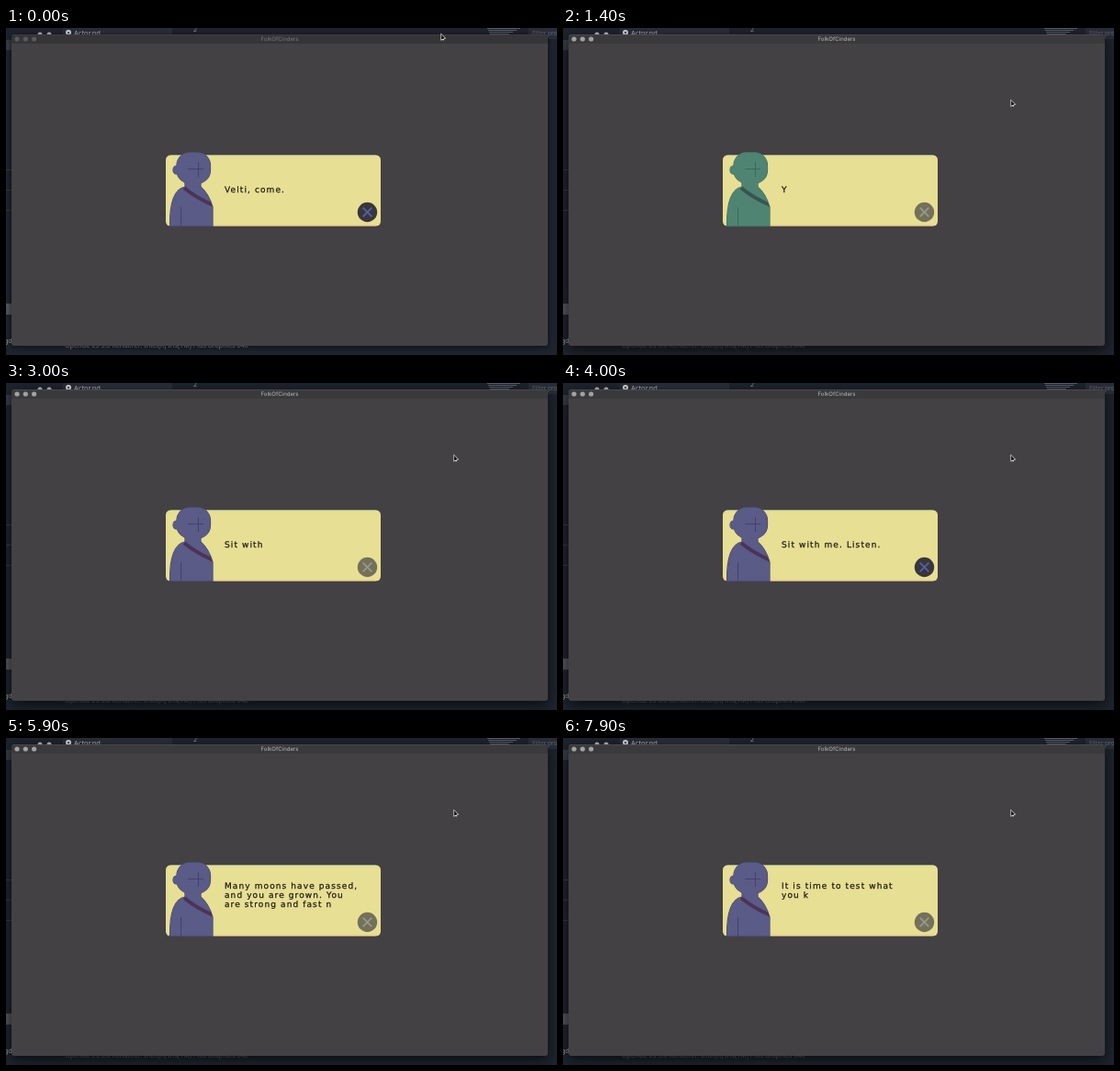
These frames come from a looping animation (600x356 px, 8 s). An HTML page with a canvas:

```html
<!DOCTYPE html>
<html lang="en">
<head>
<meta charset="utf-8">
<title>Dialogue box</title>
<style>
  html, body { margin: 0; width: 600px; height: 356px; overflow: hidden; background: #1e232d; }
  body { position: relative; }
  canvas { display: block; }
  #title, #speech { position: absolute; white-space: pre; text-rendering: geometricPrecision; }
  #title { left: 6px; width: 584px; top: 7.5px; text-align: center; font: 6.1px/10px Inter, sans-serif; }
  #speech {
    left: 238px; color: #211a14; letter-spacing: 1.1px;
    font: 9px/9.7px "DejaVu Sans", sans-serif; -webkit-text-stroke: 0.25px #211a14;
  }
</style>
</head>
<body>
<canvas id="stage" width="600" height="356"></canvas>
<div id="title">FolkOfCinders</div>
<div id="speech"></div>
<script>
const LOOP = 8000, STEP = 100, RATE = 0.04, LINE = 9.7;
const FOCUS = 900;
const ctx = document.getElementById('stage').getContext('2d');
const title = document.getElementById('title');
const speech = document.getElementById('speech');

const BLUE = { body: '#5a5b86', edge: '#46406c', sash: '#4a3458' };
const GREEN = { body: '#4f8473', edge: '#3a6a5e', sash: '#36564f' };

const lines = [
  { start: -2000, who: BLUE, text: 'Velti, come.' },
  { start: 1375, who: GREEN, text: 'Yes, Dorvel. What is it?' },
  { start: 2775, who: BLUE, text: 'Sit with me. Listen.' },
  { start: 4200, who: BLUE, text: 'Many moons have passed,\nand you are grown. You\nare strong and fast now,\nand I will need help.' },
  { start: 7175, who: BLUE, text: 'It is time to test what\nyou k\n\n' }
];

function rect(color, x, y, w, h) {
  ctx.fillStyle = color;
  ctx.fillRect(x, y, w, h);
}

function round(color, x, y, w, h, r) {
  ctx.fillStyle = color;
  ctx.beginPath();
  ctx.roundRect(x, y, w, h, r);
  ctx.fill();
}

function disc(color, x, y, r) {
  round(color, x - r, y - r, r * 2, r * 2, r);
}

function label(text, x, y, size, color) {
  ctx.fillStyle = color;
  ctx.font = size + 'px "Noto Sans", sans-serif';
  ctx.fillText(text, x, y);
}

// Eased progress from 0 to 1 between two times
function ease(t, from, to) {
  const k = Math.min(1, Math.max(0, (t - from) / (to - from)));
  return k * k * (3 - 2 * k);
}

function drawEditor(active) {
  rect('#1e232d', 0, 0, 600, 356);
  rect('#292e39', 62, 0, 119, 9);
  rect('#292e39', 569, 0, 31, 12);
  disc('#d5d7da', 68, 5, 3);
  disc('#292e39', 68, 5, 1);
  label('Actor.gd', 74, 8, 7.5, '#b5b8bd');
  label('2', 204, 4, 7, '#8d929b');
  label('Filter prop', 573, 8, 6.5, '#626771');
  disc('#b5b8bd', 37, 7, 2.5);
  disc('#b5b8bd', 47, 7, 2.5);
  for (let i = 0; i < 4; i++) rect('#59616d', 524 + i, i * 2, 36 - i * 5, 1);
  for (let i = 0; i < 3; i++) rect('#343943', 0, 154 + i * 22, 6, 1);
  rect('#363b45', 0, 13, 6, 11);
  rect('#50545d', 0, 300, 6, 12);
  label('gd', -2, 343, 7, '#a0a4aa');
  label('OpenGL ES 3.0 Renderer: Intel(R) Iris(TM) Plus Graphics 640', 64, 347.5, 7.2,
    active ? '#62666d' : '#8f9398');
}

function drawWindow(active) {
  ctx.save();
  ctx.shadowColor = 'rgba(0,0,0,.65)';
  ctx.shadowBlur = active ? 14 : 6;
  ctx.shadowOffsetY = active ? 4 : 1;
  round('#434143', 6, 7, 584, 339, 3);
  ctx.restore();
  round(active ? '#3a393b' : '#353437', 6, 7, 584, 10, [3, 3, 0, 0]);
  rect(active ? '#555456' : '#434245', 8, 7, 580, 0.6);
  for (let i = 0; i < 3; i++) disc(active ? '#a3a2a3' : '#59585a', 12 + i * 9.3, 12, 2.6);
  title.style.color = active ? '#b9b8b9' : '#79787a';
}

function drawPanel() {
  round('#e7df94', 174, 138.6, 234, 77, 5);
  rect('#cfe6a5', 179, 138.6, 224, 1);
  rect('#e9c18c', 179, 214.6, 224, 1);
}

const body = new Path2D();
body.moveTo(195, 164);
body.lineTo(195, 173);
body.quadraticCurveTo(178, 176, 178.5, 215.6);
body.lineTo(225, 215.6);
body.lineTo(225, 195);
body.quadraticCurveTo(221, 181, 212, 173);
body.lineTo(212, 164);

const head = new Path2D();
head.roundRect(186, 135.5, 36.5, 33.5, 14);

const ear = new Path2D();
ear.ellipse(185.5, 154.5, 3.5, 4.5, 0, 0, Math.PI * 2);

function drawPortrait(c) {
  const parts = [body, ear, head];
  ctx.save();
  ctx.strokeStyle = c.edge;
  ctx.lineWidth = 1.2;
  parts.forEach(p => ctx.stroke(p));
  ctx.fillStyle = c.body;
  parts.forEach(p => ctx.fill(p));
  rect(c.edge, 190, 195, 1, 20);
  rect(c.edge, 198, 153, 17, 1);
  rect(c.edge, 209, 146, 1, 16);
  ctx.clip(body);
  ctx.strokeStyle = c.sash;
  ctx.lineWidth = 4;
  ctx.beginPath();
  ctx.moveTo(194, 174);
  ctx.quadraticCurveTo(207, 185, 226, 193);
  ctx.stroke();
  ctx.restore();
}

function drawButton(ready) {
  const x = 393.5, y = 200.5, arm = 4.8;
  disc(ready ? '#39373b' : '#747059', x, y, 10.7);
  ctx.strokeStyle = ready ? '#5560a8' : '#96988f';
  ctx.lineWidth = 1.8;
  ctx.beginPath();
  for (const s of [-1, 1]) {
    ctx.moveTo(x - arm, y - arm * s);
    ctx.lineTo(x + arm, y + arm * s);
  }
  ctx.stroke();
}

function drawPointer(t) {
  const fall = ease(t, 0, 700), settle = ease(t, FOCUS, 1200);
  ctx.save();
  ctx.translate(473.6 + 12 * fall + 2 * settle, 6.6 + 56 * fall + 16 * settle);
  ctx.beginPath();
  ctx.moveTo(0.5, 0.5);
  ctx.lineTo(0.5, 6);
  ctx.lineTo(4.3, 4.4);
  ctx.closePath();
  ctx.moveTo(2, 4.5);
  ctx.lineTo(3, 6.8);
  ctx.strokeStyle = '#dcdcdc';
  ctx.lineWidth = 1.4;
  ctx.stroke();
  ctx.fillStyle = '#111';
  ctx.fill();
  ctx.restore();
}

function draw(t) {
  const active = t >= FOCUS;
  const line = lines.filter(l => l.start <= t).pop();
  const typed = Math.floor((t - line.start) * RATE);
  const rows = line.text.split('\n').length;

  drawEditor(active);
  drawWindow(active);
  drawPanel();
  drawPortrait(line.who);
  drawButton(typed >= line.text.length + 2);
  drawPointer(t);

  speech.style.top = 177.5 - rows * LINE / 2 + 'px';
  speech.textContent = line.text.slice(0, typed);
}

const begin = performance.now();
function tick() {
  const t = (performance.now() - begin) % LOOP;
  draw(Math.floor(t / STEP) * STEP);
  requestAnimationFrame(tick);
}
tick();
</script>
</body>
</html>
```
